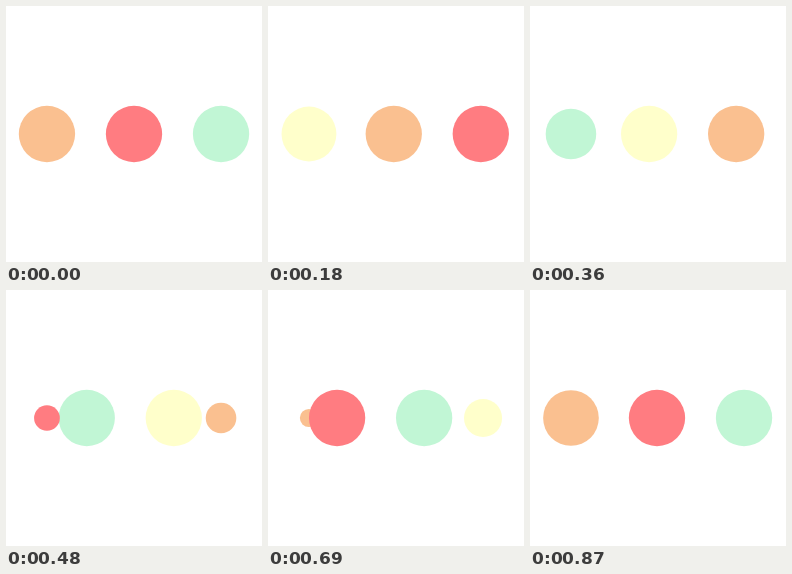
Animation, 256 px wide and 256 px high, one loop 0.9 s. Source, as an HTML page:

```html
<!DOCTYPE html>
<html lang="en">
<head>
<meta charset="utf-8">
<title>Loading dots</title>
<style>
  html, body { margin: 0; width: 100%; height: 100%; overflow: hidden; background: #fff; }
  svg { display: block; width: 100%; height: 100%; }
</style>
</head>
<body>
<svg viewBox="0 0 100 100"></svg>
<script>
const LOOP = 900, STEPS = 30;
const LEFT = 16, GAP = 34, RADIUS = 11;
const COLORS = ['#c1f6d5', '#ffffcb', '#fac090', '#ff7c81'];
const svg = document.querySelector('svg');

// cubic-bezier(0, .5, .5, 1), solved by bisection
function ease(u) {
  let lo = 0, hi = 1;
  for (let i = 0; i < 40; i++) {
    const s = (lo + hi) / 2;
    if (s * s * (1.5 - s / 2) < u) lo = s; else hi = s;
  }
  return lo * (1.5 - lo * lo / 2);
}

function addDot(pose) {
  const dot = document.createElementNS('http://www.w3.org/2000/svg', 'circle');
  dot.setAttribute('cy', 50);
  svg.append(dot);

  const frames = [];
  for (let n = 0; n <= STEPS; n++) {
    const t = n * 4 / STEPS, quarter = Math.floor(t);
    const { x, r, fill } = pose(quarter % 4, t === quarter ? 0 : ease(t - quarter));
    frames.push({ offset: n / STEPS, cx: x + 'px', r: r + 'px', fill, easing: 'steps(1, end)' });
  }
  // The 1 ms lead keeps step edges clear of rounding.
  dot.animate(frames, { duration: LOOP, iterations: Infinity, delay: -1 });
}

// Shrinks on the right, taking over the colour of the dot that just arrived.
addDot((quarter, p) => ({
  x: LEFT + 2 * GAP,
  r: RADIUS * (1 - p),
  fill: COLORS[(4 - quarter) % 4]
}));

// Each dot waits, grows, then moves right twice.
COLORS.forEach((fill, i) => addDot((quarter, p) => {
  const stage = (quarter + i) % 4;
  return {
    x: LEFT + GAP * (stage < 2 ? 0 : stage - 2 + p),
    r: RADIUS * [0, p, 1, 1][stage],
    fill
  };
}));
</script>
</body>
</html>
```
